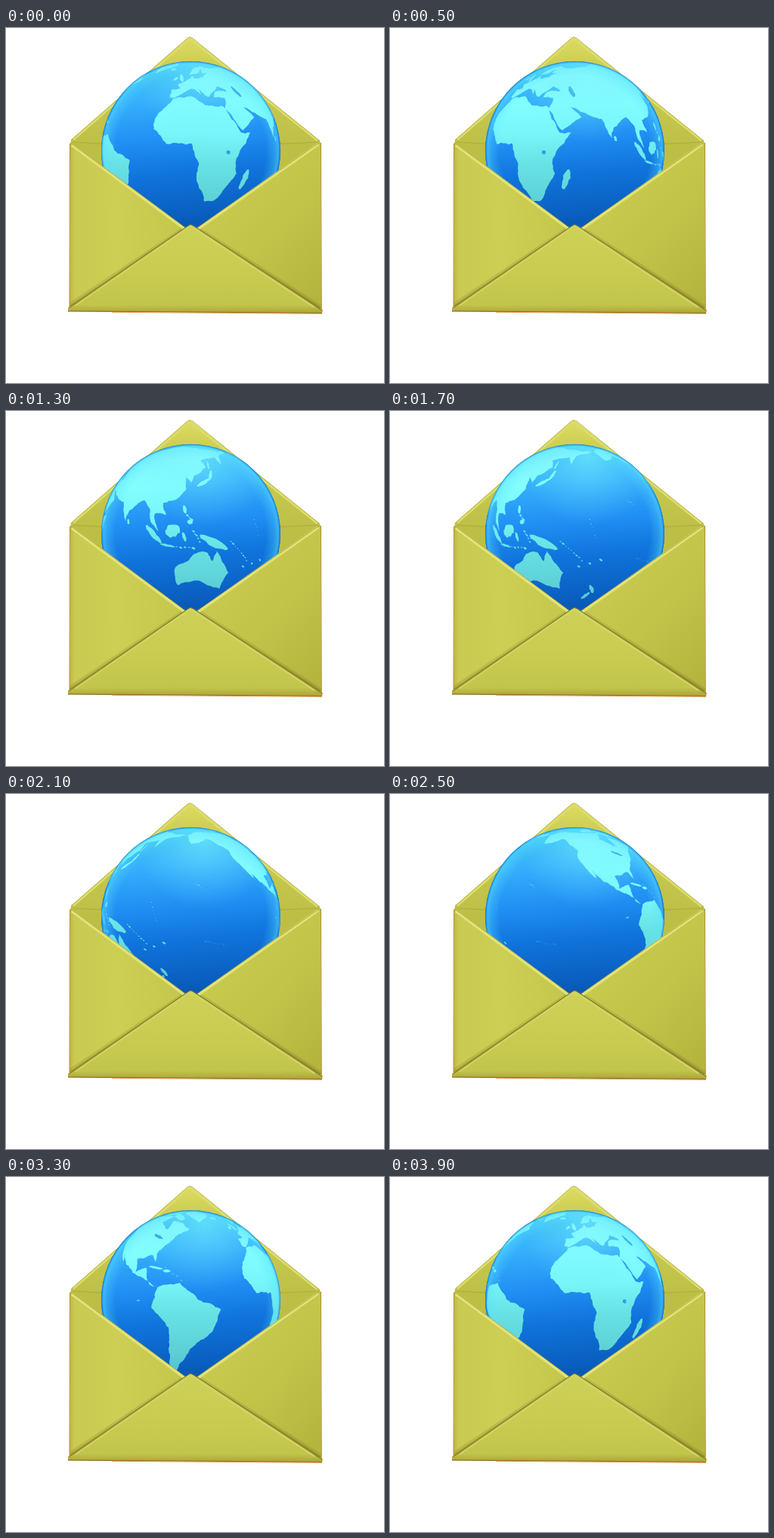
Animation of 500x470 px, one loop 4000 ms. Source, as an HTML page with a canvas:

```html
<!DOCTYPE html>
<html lang="en">
<head>
<meta charset="utf-8">
<title>Globe in an envelope</title>
<style>
  html, body { margin: 0; width: 100%; height: 100%; overflow: hidden; background: #fff; }
  canvas { display: block; }
</style>
</head>
<body>
<canvas id="stage" width="500" height="470"></canvas>
<script>
const ctx = document.getElementById('stage').getContext('2d');
const CX = 244.5, CY = 162.5, R = 118.5;
const STEP = 100, STEPS = 40, START_LON = 8.3;
const RAD = Math.PI / 180;
const lands = [], lakes = [];

let seed = 7;
const rand = () => (seed = seed * 16807 % 2147483647) / 2147483647;

// Splits an edge by midpoint displacement into a natural coastline.
function coast(a, b, out) {
  const dx = b[0] - a[0], dy = b[1] - a[1], len = Math.hypot(dx, dy);
  if (len < 1.6) { out.push(a); return; }
  const k = Math.min(0.22, 1.6 / len) * (rand() - 0.5);
  const mid = [a[0] + dx / 2 - dy * k, a[1] + dy / 2 + dx * k];
  coast(a, mid, out);
  coast(mid, b, out);
}

// A landmass from key points along its coast, as lon/lat pairs.
function land(...c) {
  const out = [];
  for (let i = 0; i < c.length; i += 2) {
    const j = (i + 2) % c.length;
    coast([c[i], c[i + 1]], [c[j], c[j + 1]], out);
  }
  lands.push(out);
}

// A long island or lake between two ends.
function lens(list, lon0, lat0, lon1, lat1, width) {
  const dx = (lon1 - lon0) / 2, dy = (lat1 - lat0) / 2, len = Math.hypot(dx, dy);
  const out = [];
  for (let a = 0; a < 360; a += 15) {
    const u = Math.cos(a * RAD), v = Math.sin(a * RAD) * width / len * (0.75 + rand() * 0.5);
    out.push([lon0 + dx + dx * u - dy * v, lat0 + dy + dy * u + dx * v]);
  }
  list.push(out);
}
const isle = (...a) => lens(lands, ...a);
const lake = (...a) => lens(lakes, ...a);

// A row of scattered islets.
function chain(lon0, lat0, lon1, lat1, n, size) {
  for (let i = 0; i < n; i++) {
    const u = i / (n - 1), s = size * (0.5 + rand());
    const lon = lon0 + (lon1 - lon0) * u, lat = lat0 + (lat1 - lat0) * u + rand() - 0.5;
    isle(lon - s, lat + s / 2, lon + s, lat - s / 2, s * 0.6);
  }
}

// Eurasia
land(-9,37, -9,43, -1,44, -4,48, 8,54, 10,57, 12,54, 21,55, 29,60, 22,61, 24,66, 17,60, 6,58,
  14,68, 27,71, 41,67, 68,69, 104,77, 140,73, 190,66, 163,60, 157,51, 155,59, 136,55, 140,48,
  128,40, 126,35, 121,40, 122,30, 114,22, 106,20, 109,12, 101,13, 104,1.5, 98,9, 97,16, 91,22,
  80,15, 78,8, 72,21, 57,26, 48,30, 58,22, 45,13, 34,28, 36,36, 27,37, 29,41, 41,42, 33,46,
  23,37, 13,45, 17,39, 9,44, 0,39, -5,36);
// Africa
land(-6,35.5, -17,21, -17,14, -7.5,4.4, 9,4.5, 13.5,-9, 12,-17, 18.5,-34.4, 26,-34, 35,-22,
  40,-15, 39,-5, 51,11.8, 43,12, 32.5,30, 19,30.5, 10,37);
// North America
land(-168,66, -157,71, -82,69, -94,60, -79,52, -78,62, -65,59, -56,52, -66,47, -81,31, -80,25,
  -84,30, -97,27, -95,18, -87,21, -83,10, -77,8, -94,16, -106,23, -114,31, -110,23, -124,41,
  -124,48, -140,60, -163,55);
land(-73,78, -53,67, -44,60, -20,72, -35,83);
// South America
land(-77,8, -62,11, -50,0, -35,-6, -40,-21, -48,-27, -57,-37, -69,-51, -68,-55, -75,-50,
  -70,-18, -81,-5);
// Australia
land(114,-23, 130,-12, 136,-12, 140,-18, 142.5,-11, 153,-26, 149,-38, 138,-35, 130,-31.5, 115,-35);

isle(131, -1, 150, -10, 2.5);        // New Guinea
isle(109, 0, 118, 4, 4);             // Borneo
isle(95, 5.5, 106, -6, 1.6);         // Sumatra
isle(105, -6.5, 115, -8.5, 0.8);     // Java
isle(120, 1, 122, -5, 1);            // Sulawesi
isle(120.5, 18.5, 122, 13, 1.1);     // Luzon
isle(123, 8, 126.5, 7, 1.4);         // Mindanao
isle(130, 32, 141, 38, 1.2);         // Honshu
isle(140.5, 37, 144, 45, 1.3);       // Hokkaido
isle(142, 46, 143.5, 54, 0.8);       // Sakhalin
isle(80, 9.5, 81, 6, 0.9);           // Sri Lanka
isle(49.5, -12, 45, -25.5, 2.3);     // Madagascar
isle(-4, 58.5, 0, 50.5, 1.9);        // Great Britain
isle(-10, 52, -6, 55, 1.4);          // Ireland
isle(-24, 65.5, -14, 65, 1.5);       // Iceland
isle(173, -35, 177, -41.5, 1.4);     // New Zealand
isle(174, -41, 167, -46.5, 1.3);
isle(-85, 22, -74, 20, 0.8);         // Cuba
isle(-74, 19, -68.5, 18.5, 0.9);     // Hispaniola
isle(-85, 73, -64, 64, 4);           // Baffin
isle(-115, 72, -75, 80, 5);          // Arctic islands
lake(48, 46, 53, 37, 1.8);           // Caspian Sea
lake(32, 0, 34, -2, 1.2);            // Lake Victoria
lake(-91, 47, -80, 43, 1.2);         // Great Lakes

chain(152, -5, 166, -17, 9, 0.6);
chain(116, -8.5, 127, -8.8, 5, 0.8);
chain(123, 12, 126, 9, 4, 0.7);
chain(127, 2, 131, -5, 5, 0.6);
chain(164, -21, 179, -17, 3, 0.8);
chain(-160, 22, -155.5, 19.5, 4, 0.4);
chain(-153, -16, -140, -18, 8, 0.3);
chain(171, 9, 175, -3, 6, 0.3);
chain(-78, 25, -61, 13, 7, 0.35);
chain(-92, -0.5, -90, -0.7, 3, 0.4);

function fillRing(pts, lon0) {
  ctx.beginPath();
  let seen = false;
  for (const [lon, lat] of pts) {
    const a = (lon - lon0) * RAD, b = lat * RAD;
    const x = Math.sin(a) * Math.cos(b), y = -Math.sin(b);
    const front = Math.cos(a) > 0;
    // Hidden points slide out beyond the rim, where they are clipped.
    const s = front ? R : R * 1.5 / Math.hypot(x, y);
    seen = seen || front;
    ctx.lineTo(CX + x * s, CY + y * s);
  }
  if (seen) ctx.fill();
}

function stops(g, ...list) {
  list.forEach(([at, color]) => g.addColorStop(at, color));
  return g;
}
const linear = (x0, y0, x1, y1, ...list) => stops(ctx.createLinearGradient(x0, y0, x1, y1), ...list);
const radial = (x, y, r0, r1, ...list) => stops(ctx.createRadialGradient(x, y, r0, x, y, r1), ...list);

const oceanFill = linear(235, 44, 255, 281, [0, '#3cc4f2'], [0.2, '#36b0fc'], [0.42, '#2190f4'],
  [0.62, '#1074dc'], [0.85, '#0a5fc0'], [1, '#0850a8']);
const landFill = linear(0, 44, 0, 270, [0, '#84f4fa'], [0.25, '#82feff'], [0.42, '#78f6fa'],
  [0.6, '#68e2e4'], [0.8, '#5ed2d8'], [1, '#50bcd0']);
const shine = radial(262, 62, 0, 90, [0, 'rgba(130,250,255,.5)'], [0.5, 'rgba(120,240,255,.25)'],
  [1, 'rgba(110,235,255,0)']);
const rim = radial(CX, CY, R * 0.84, R, [0, 'rgba(90,225,255,0)'], [0.6, 'rgba(90,225,255,.28)'],
  [0.85, 'rgba(90,225,255,.5)'], [0.93, 'rgba(40,160,230,.55)'], [1, 'rgba(5,95,180,.85)']);

function drawGlobe(lon0) {
  const fill = style => {
    ctx.fillStyle = style;
    ctx.fillRect(CX - R, CY - R, 2 * R, 2 * R);
  };
  ctx.save();
  ctx.beginPath();
  ctx.arc(CX, CY, R, 0, 7);
  ctx.clip();
  fill(oceanFill);
  ctx.fillStyle = landFill;
  lands.forEach(r => fillRing(r, lon0));
  ctx.fillStyle = '#2aa2e4';
  lakes.forEach(r => fillRing(r, lon0));
  fill(shine);
  fill(rim);
  ctx.restore();
}

function trace(...c) {
  ctx.beginPath();
  for (let i = 0; i < c.length; i += 2) ctx.lineTo(c[i], c[i + 1]);
}
function shape(fill, ...c) {
  trace(...c);
  ctx.closePath();
  ctx.fillStyle = fill;
  ctx.fill();
}
function line(color, width, ...c) {
  trace(...c);
  ctx.strokeStyle = color;
  ctx.lineWidth = width;
  ctx.stroke();
}

function drawBack() {
  shape('#bdbe46', 86, 149, 415, 150, 416, 154, 244, 275, 85, 154);
  shape(linear(0, 12, 0, 152, [0, '#dcdc62'], [0.25, '#cdce53'], [1, '#bfc048']),
    86, 148, 239, 14, 243, 12, 247, 14, 415, 149, 415, 152, 86, 151);
  line('#dcdd6c', 2.5, 89, 148, 243, 14, 412, 149);
  line('#b0ab40', 0.8, 86, 148.5, 240, 13.5, 243, 12, 247, 13.5, 415, 149.5);
  line('#aeac3e', 1.2, 88, 151, 140, 154);
  line('#aeac3e', 1.2, 413, 151, 350, 154);
}

function drawFront() {
  shape(linear(84, 0, 240, 0, [0, '#bdb443'], [0.04, '#c8ca51'], [0.4, '#cccf54'], [1, '#c4c64c']),
    85, 152, 88, 153, 237, 265, 244, 272, 84, 371);
  shape(linear(260, 200, 417, 350, [0, '#cbcd52'], [0.5, '#c2c44a'], [1, '#b4b53e']),
    416, 151, 412, 152, 253, 265, 244, 272, 417, 374);

  line('#e2e478', 3.5, 87, 155, 237, 266.5);
  line('#e2e478', 3.5, 413, 154, 254, 266);
  line('#a99a38', 0.8, 86, 152.5, 238, 265);
  line('#a99a38', 0.8, 415, 151.5, 253, 264.5);
  line('#b98e3e', 1, 84.5, 153, 84, 370);
  line('#a88a36', 1, 416.5, 152, 417.3, 375);

  line('rgba(95,82,15,.14)', 8, 86, 367, 234, 268);
  line('rgba(95,82,15,.14)', 8, 256, 268, 415, 370);
  line('rgba(95,82,15,.3)', 3.5, 85, 369, 238, 265);
  line('rgba(95,82,15,.3)', 3.5, 251, 265, 416, 371.5);
  shape(linear(0, 260, 0, 378, [0, '#ced157'], [0.5, '#c9cc51'], [0.9, '#c2c54b'], [1, '#aaa338']),
    82, 370, 86, 369, 240, 262.5, 244, 260, 248, 262, 415, 372, 419, 373, 418, 378, 82, 375);
  line('#d4d666', 1.5, 92, 367.5, 244, 262.5, 408, 370);
  line('#84742a', 1, 83, 371, 240, 262.5, 244, 260.3, 248, 262, 418, 374);
  line('#8f7026', 1.2, 82, 374.8, 418, 377.4);
  line('#e8a458', 1, 140, 376.3, 418, 378.3);
}

let shown = -1;
function frame() {
  const step = Math.floor(performance.now() / STEP) % STEPS;
  if (step !== shown) {
    shown = step;
    ctx.fillStyle = '#fff';
    ctx.fillRect(0, 0, 500, 470);
    drawBack();
    drawGlobe(START_LON + step * 360 / STEPS);
    drawFront();
  }
  requestAnimationFrame(frame);
}
frame();
</script>
</body>
</html>
```
